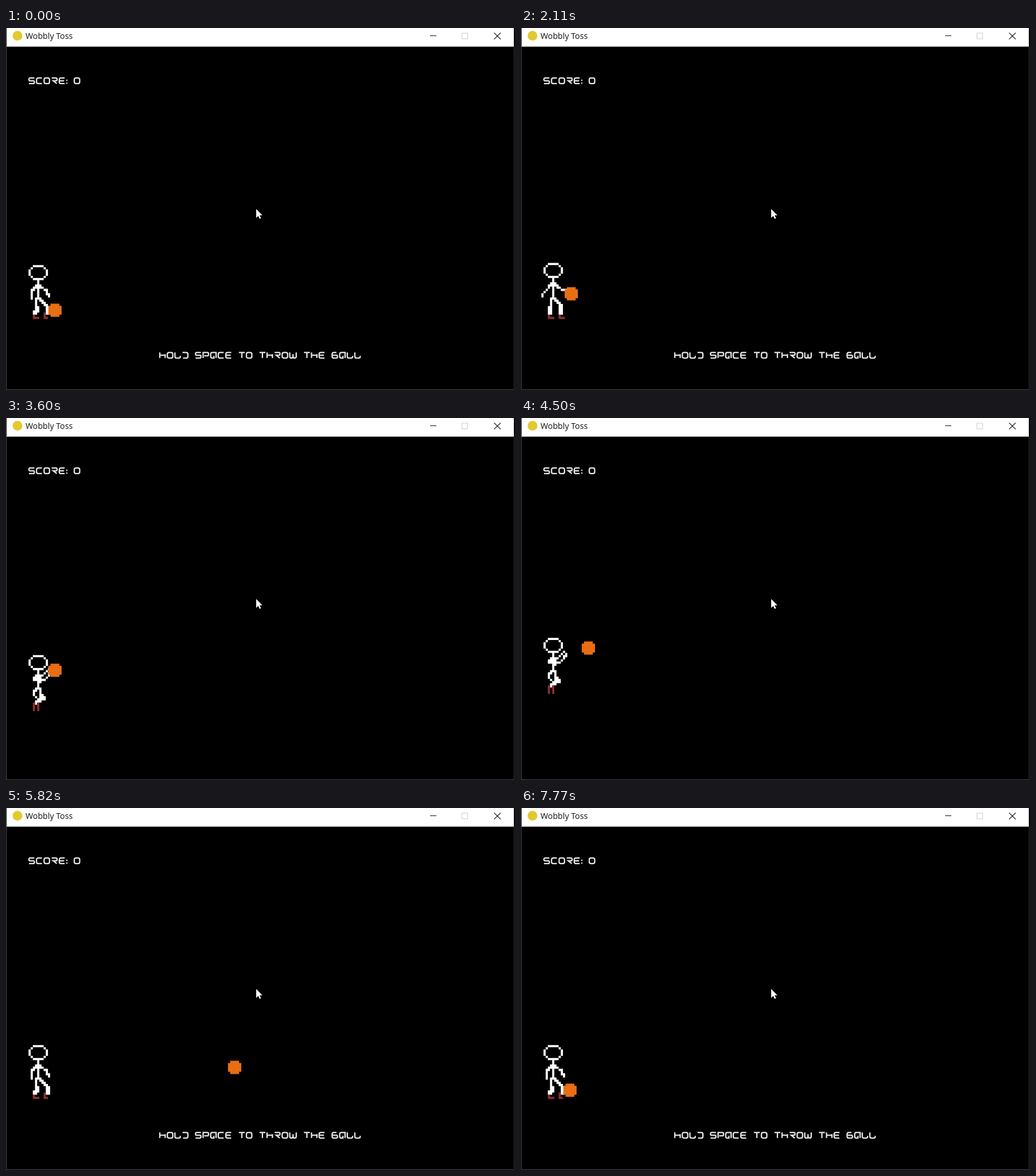
Write an HTML page that moves like this. It is 887 px wide and 631 px high and loops after 8 s.

```html
<!DOCTYPE html>
<html lang="en">
<head>
<meta charset="utf-8">
<title>Wobbly Toss</title>
<style>
html, body { margin: 0; width: 100%; height: 100%; overflow: hidden; background: #000; }
svg { display: block; width: 887px; height: 631px; }
.title { font: 14.2px "Open Sans", "Noto Sans", sans-serif; fill: #111; }
.icon { fill: none; stroke: #111; stroke-width: 1; }
.label path { fill: none; stroke: #e6e6e6; stroke-width: 2.3; vector-effect: non-scaling-stroke; }
.soft { filter: blur(.4px); }
.body { fill: #fff; }
.shoes { fill: #8c2f2d; }
.ball { fill: #e86e14; }
</style>
</head>
<body>
<svg viewBox="0 0 887 631">
  <rect width="887" height="631"/>
  <path d="M.5 32V630.5H886" fill="none" stroke="#4a4a4a"/>
  <path d="M885.5 32V630" stroke="#3a3a3a"/>
  <rect x="1" width="884" height="32.5" fill="#fff"/>
  <circle cx="20" cy="13.5" r="8.5" fill="#e3c92f"/>
  <text class="title" x="34" y="19">Wobbly Toss</text>
  <path class="icon" d="M739 13.5H750"/>
  <rect class="icon" x="794.5" y="8.9" width="10" height="10" style="stroke:#ccc"/>
  <path class="icon" d="M850.5 8.4L862 19.6M862 8.4L850.5 19.6" style="stroke-width:1.3"/>
  <g class="label" id="score"></g>
  <g class="label" id="hint"></g>
  <g class="soft"><g id="player"></g></g>
  <g class="soft"><path class="ball" id="ball"/></g>
  <path d="M436 315.5V331L439.6 327.5L442 332.7L444.4 331.6L442 326.6H446.8Z" fill="#fff"/>
</svg>
<script>
const $ = id => document.getElementById(id);
const NS = 'http://www.w3.org/2000/svg';
const CELL = 3.76, LEFT = 35.5, TOP = 409.5, LOOP = 8000;

function addPath(parent, d, cls = '') {
  const p = document.createElementNS(NS, 'path');
  p.setAttribute('d', d);
  p.setAttribute('class', cls);
  return parent.appendChild(p);
}

// Lettering: strokes in a 10 x 10 box
const ring = 'M3 0H7Q10 0 10 3V7Q10 10 7 10H3Q0 10 0 7V3Q0 0 3 0Z';
const cup = 'M10 0H3Q0 0 0 3V7Q0 10 3 10H10';
const glyphs = {
  S: 'M10 0H2Q0 0 0 2V3Q0 5 2 5H8Q10 5 10 7V8Q10 10 8 10H0',
  P: 'M0 10V0H8Q10 0 10 2V4Q10 6 8 6H2',
  A: 'M10 10V0H3Q0 0 0 3V7Q0 10 3 10H6V6',
  B: 'M8 0H3Q0 0 0 3V7Q0 10 3 10H8Q10 10 10 7.5T8 5H0',
  C: cup,
  E: cup + 'M0 5H9',
  D: 'M0 0H7Q10 0 10 3V7Q10 10 7 10H1',
  H: 'M0 0V10M0 5H10M10 3V10',
  L: 'M0 0V7Q0 10 3 10H7Q10 10 10 7V6',
  O: ring, 0: ring,
  R: 'M0 0H8Q10 0 10 2.5T8 5H3L9.5 10',
  T: 'M0 0H11M5.5 0V10',
  W: 'M0 0V7Q0 10 3 10T6 7V3M6 7Q6 10 9 10T12 7V0',
  ':': 'M0 3V5M0 8V10'
};
const widths = { ' ': 9.5, ':': 3.5, W: 15.2 };

function write(id, text, x, y) {
  const g = $(id);
  g.setAttribute('role', 'img');
  g.setAttribute('aria-label', text);
  for (const ch of text) {
    if (glyphs[ch])
      addPath(g, glyphs[ch]).setAttribute('transform', `translate(${x} ${y}) scale(.94 .97)`);
    x += widths[ch] || 13.2;
  }
}
write('score', 'SCORE: 0', 40, 87.2);
write('hint', 'HOLD SPACE TO THROW THE BALL', 268, 565.6);

// Limbs are polylines on the pixel grid: "x,y x,y|x,y x,y"
function pixels(limbs) {
  let d = '';
  for (const limb of limbs.split('|')) {
    const pts = limb.split(' ').map(p => p.split(',').map(Number));
    pts.forEach(([x, y], i) => {
      const [u, v] = pts[i + 1] || [x, y];
      const n = Math.max(Math.abs(u - x), Math.abs(v - y), 1);
      for (let k = 0; k <= n; k++)
        d += `M${Math.round(x + (u - x) * k / n)} ${Math.round(y + (v - y) * k / n)}h1v1h-1z`;
    });
  }
  return d;
}
const head = y => `3,${y} 7,${y} 9,${y + 2} 9,${y + 4} 7,${y + 6} 3,${y + 6} 1,${y + 4} 1,${y + 2} 3,${y}|5,${y + 7} 5,16|`;
const figures = {
  down: [
    head(1) + '4,10 2,12 2,16|6,10 7,11 9,13 10,14 10,15|8,12 9,12|9,14 9,14|3,11 7,11|3,12 3,12|4,16 4,23|5,20 5,22|3,22 3,23|6,16 9,19|6,17 9,20 9,23|10,20 10,23',
    '3,24 3,25 5,25|8,23 8,25 9,25'],
  up: [
    head(0) + '4,9 6,9|4,10 2,12 0,14 0,15|3,10 7,10|6,10 9,12 11,12|7,11 8,11|4,16 4,23|3,20 3,23|6,17 8,19 8,23|6,16 9,19 9,23',
    '3,24 3,25 5,25|8,24 8,25 10,25'],
  shoot: [
    head(1) + '4,10 6,10 8,9|3,11 6,11|3,12 8,12 10,10|9,8 10,7 11,8 11,9 10,9|5,13 6,13|4,16 3,17 3,19 4,20|4,17 4,17|6,16 6,22|7,19 7,21|8,20 8,21|5,21 5,22|4,22 4,23',
    '3,23 3,26|5,23 5,26']
};
const poses = {};
for (const name in figures) {
  const g = poses[name] = $('player').appendChild(document.createElementNS(NS, 'g'));
  addPath(g, pixels(figures[name][0]), 'body');
  addPath(g, pixels(figures[name][1]), 'shoes');
}
$('ball').setAttribute('d', 'M-2-3h4v1h1v4h-1v1h-4v-1h-1v-4h1z');

// The game is seen in uneven ticks
const ticks = [0, 120, 400, 800, 1100, 1280, 1450, 1630, 1810, 2110, 2380,
  2780, 2910, 3050, 3180, 3320, 3460, 3600, 3720,
  3860, 3990, 4120, 4250, 4380, 4500, 4650, 4770, 4890,
  5040, 5200, 5320, 5450, 5580, 5710, 5840, 5970,
  6090, 6230, 6360, 6510, 6780, 7070, 7490, 7770];
const between = (t, a, b) => t >= a && t < b;
const jump = t => Math.max(0, 39 - 1.1e-4 * (t - 4215) ** 2);

function pose(t, i) {
  if (t < 2910) return i % 2 ? 'up' : 'down';
  if (t < 4890) return 'shoot';
  const up = between(t, 5450, 5710) || between(t, 5970, 6230) || between(t, 6360, 6510)
    || between(t, 6780, 7070) || between(t, 7490, 7770);
  return up ? 'up' : 'down';
}

function ballAt(t, figure) {
  if (between(t, 2910, 4500)) {
    const lift = Math.min(1, (t - 2780) / 400);
    return [85.3, 463 - 23.3 * lift - jump(t)];
  }
  if (between(t, 4500, 6090)) {
    const d = t - 4500;
    const x = t < 5200 ? 117.4 + d * .2371 : 283.4 + (t - 5200) * .2255;
    return [x, 401 + .0063 * d + 2.97e-5 * d * d];
  }
  const held = figure === 'up' && !between(t, 6090, 6510);
  return held ? [87.6, 463.2] : [85.3, 492];
}

function draw(now) {
  const time = now % LOOP;
  let i = ticks.length - 1;
  while (ticks[i] > time) i--;
  const t = ticks[i], figure = pose(t, i), [x, y] = ballAt(t, figure);
  for (const name in poses) poses[name].style.display = name === figure ? '' : 'none';
  const h = figure === 'shoot' ? jump(t) : 0;
  $('player').setAttribute('transform', `translate(${LEFT} ${TOP - h}) scale(${CELL})`);
  $('ball').setAttribute('transform', `translate(${x} ${y}) scale(3.85)`);
  $('hint').style.display = between(t, 2910, 5040) ? 'none' : '';
}

const start = performance.now();
function loop() {
  draw(performance.now() - start);
  requestAnimationFrame(loop);
}
loop();
</script>
</body>
</html>
```
